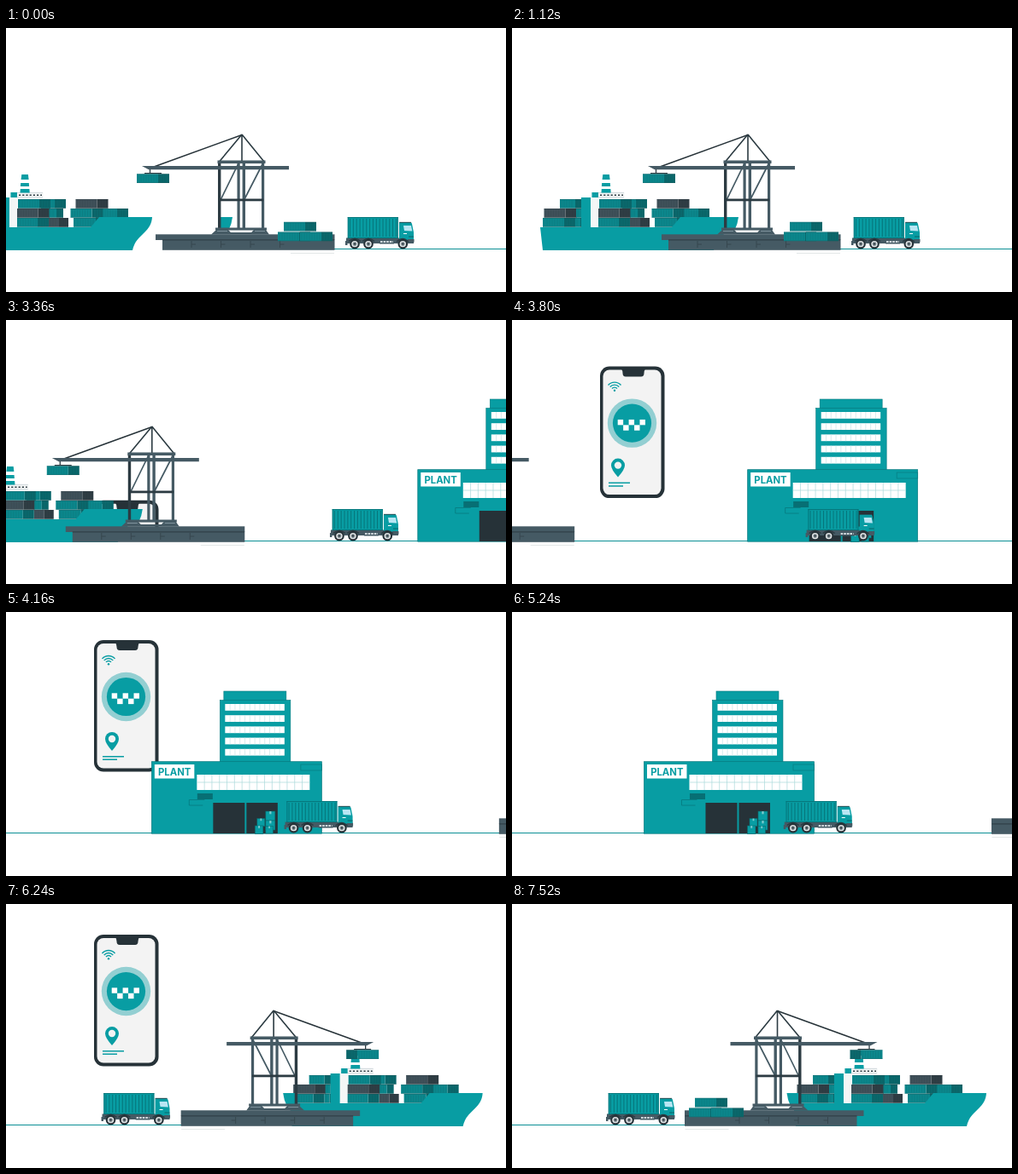
Animation, 585 px wide and 310 px high, one loop 8.04 s. Source, as an HTML page:

```html
<!DOCTYPE html>
<html lang="en">
<head>
<meta charset="utf-8">
<title>Container transport</title>
<style>
html, body { margin: 0; width: 100%; height: 100%; overflow: hidden; background: #fff; }
svg { display: block; }
</style>
</head>
<body>
<svg width="585" height="310" viewBox="0 0 585 310">
  <clipPath id="above"><rect width="585" height="259"/></clipPath>
  <g clip-path="url(#above)"><g id="phone"></g></g>
  <line id="ground" y1="259.5" y2="259.5" stroke="#0a8f95"/>
  <g id="plant"></g>
  <g id="ship1"></g>
  <g id="ship2"></g>
  <g id="port1"></g>
  <g id="port2"></g>
  <g id="load1"></g>
  <g id="load2"></g>
  <g id="truck"></g>
</svg>
<script>
const LOOP = 8040;
const TEAL = '#089da3', MID = '#0b878c', DEEP = '#0a686c';
const SLATE = '#455a64', DARK = '#263238', GREY = '#3f5059', INK = '#2c3b42';
const $ = id => document.getElementById(id);

const rect = (x, y, w, h, fill, extra = '') =>
  `<rect x="${x}" y="${y}" width="${w}" height="${h}" fill="${fill}" ${extra}/>`;
const path = (d, stroke, width = 1, extra = '') =>
  `<path d="${d}" fill="none" stroke="${stroke}" stroke-width="${width}" ${extra}/>`;
const shape = (d, fill) => `<path d="${d}" fill="${fill}"/>`;
const circle = (x, y, r, fill) => `<circle cx="${x}" cy="${y}" r="${r}" fill="${fill}"/>`;
const range = (n, f) => Array.from({ length: n }, (_, i) => f(i)).join('');

// Ribbed panel
function panel(x, y, w, h, fill) {
  const n = Math.floor((w - 1) / 3);
  return rect(x, y, w, h, fill) + path(`M${x} ${y + .4}h${w}M${x} ${y + h - .4}h${w}`, DARK, .6, 'opacity=".35"') +
    path(range(n, i => `M${x + 2 + i * 3} ${y + 1.5}v${h - 3}`), DARK, .5, 'opacity=".2"');
}

// Container with a lit long side and a shaded end
const container = (x, y, gray, w = 38, split = 25, h = 10.7) =>
  panel(x, y, split, h, gray ? GREY : MID) + panel(x + split, y, w - split, h, gray ? '#2f3d44' : DEEP);

function ship() {
  const tops = [201, 212, 223];
  return container(56, tops[0], 0, 26, 18) +
    container(37.5, tops[1], 1) + container(75, tops[1], 0, 8, 6) +
    container(36, tops[2], 0) + container(74, tops[2], 0, 9, 6) +
    container(129, tops[0], 0, 29, 16) + container(102, tops[0], 0) +
    container(138, tops[1], 0, 17, 9) + container(100.5, tops[1], 1) +
    container(138, tops[2], 1, 23, 12) + container(100, tops[2], 0) +
    container(169.5, tops[0], 1) +
    container(193, tops[1], 0) + container(163.5, tops[1], 0) +
    container(167, tops[2], 0, 34, 26) +
    rect(92, 193, 9, 41, '#f4f6f6') + rect(81, 199, 11, 36, TEAL) +
    rect(93.5, 193, 38, 6, '#f4f6f6') + rect(93.5, 193, 7.5, 6, TEAL) +
    path('M101 193.3h30M101 199h30', '#b0bec5', .6) +
    path('M103 196.2h27', INK, 1.6, 'stroke-dasharray="2.2 2"') +
    shape('M106.3 172h7.6l.7 6h-9zM105.2 182h9.6l.3 4h-10.2zM104.8 189h10.6l.3 4.5h-11.2z', TEAL) +
    shape('M33 234H187L197 222H259C258 241 240 242 236 261H36Z', TEAL);
}

function port() {
  return shape('M251 222H265Q264 230 261 236H251Z', TEAL) +
    // crane
    path('M276 125.5L173 163', DARK, 1.5) +
    path('M276 125L249.5 157M276 125L302 157M276 125V157', INK, 1.6) +
    path('M271.5 160L251.5 201M300 160L279 201', SLATE, 1.7) +
    rect(270.5, 158, 3.2, 78, SLATE) + rect(276.6, 158, 3.4, 78, SLATE) +
    rect(299, 158, 3.2, 78, SLATE) + rect(248, 158, 3.4, 78, INK) +
    rect(249, 200.5, 52, 2.8, INK) +
    rect(247.5, 155.5, 56, 3.6, SLATE) +
    shape('M159 162H331V166.2H167Z', SLATE) +
    rect(245, 234.5, 60, 3, SLATE) + shape('M246 237H260L263 240H287L290 237H304L308 242.5H240Z', SLATE) +
    path('M247 238.5h12M291 238.5h12', '#90a4ae', .8) +
    // trolley and hanging load
    path('M168.5 166V170M162 170.6H182', INK, 1.3) +
    container(153, 171.3, 0) +
    // quay
    rect(175, 242.3, 209.5, 6.7, SLATE) + rect(183, 248.5, 201.5, 12.3, SLATE) +
    path('M183 248.9H384', DARK, .8) +
    range(4, i => path(`M${217 + i * 34.5} 250v8m0-4h5`, '#37474f', 1)) +
    path('M333 264.5H384', '#e3e7e8');
}

function plant() {
  const windows = range(5, i => {
    const y = 108 + i * 13.2;
    return rect(86, y, 69.5, 7.8, '#fff') +
      path(range(11, k => `M${91.8 + k * 5.8} ${y}v7.8`), '#c5e4e6', .7);
  });
  const box = (x, y, s) => rect(x, y, s, s, TEAL, 'stroke="#0a686c" stroke-width=".6"') +
    rect(x + s * .4, y, s * .2, s * .3, '#7cc9cc');
  return rect(84.5, 93, 73, 11, TEAL, 'stroke="#07797e" stroke-width=".6"') +
    rect(80, 103.5, 82.5, 73, TEAL, 'stroke="#07797e" stroke-width=".6"') + windows +
    rect(0, 175.7, 199, 84.5, TEAL, 'stroke="#07797e" stroke-width=".7"') +
    rect(174.5, 179, 24.5, 7, 'none', 'stroke="#078085" stroke-width=".8"') +
    rect(3.5, 179, 46.5, 16.5, '#fff') +
    `<text x="26.8" y="191.5" text-anchor="middle" font-family="Inter, Open Sans, sans-serif" font-weight="700" font-size="11.3" fill="${TEAL}">PLANT</text>` +
    rect(53, 191, 132, 18, '#fff') +
    path(range(14, i => `M${61.8 + i * 8.8} 191v18`) + 'M53 200h132', '#a9d8da', .7) +
    rect(53.5, 213, 18, 7, '#076f74') +
    path('M44 220.5H62M44 220.5V227H60', '#07797e', .8) +
    rect(72, 224, 37, 36, DARK) + rect(111, 224, 36.5, 36, DARK) +
    box(133.5, 234, 11) + box(123.5, 242.5, 9) + box(133.5, 245, 11) +
    box(121, 251, 9.5) + box(133.5, 251.5, 8.5);
}

function truck() {
  const wheel = x => circle(x, 253.6, 5.8, DARK) + circle(x, 253.6, 3.7, '#e4e7e8') +
    circle(x, 253.6, 2.3, '#78858b') + circle(x, 253.6, 1, DARK);
  return rect(398, 246.5, 79, 6.5, SLATE) + rect(397, 250, 2.5, 5, SLATE) +
    rect(399.8, 222, 59, 25, TEAL) +
    path(range(15, i => `M${402.5 + i * 3.85} 224v21`), '#06757a', 1) +
    path('M399.8 222.6h59M399.8 246.5h59M400.3 222v25M458.3 222v25', '#06757a', 1) +
    shape('M460 229Q460 228 461 228H473Q474.5 228 475 230L477 240V249H460Z', TEAL) +
    path('M460 228.3H474', DARK, .8) +
    shape('M465 232H474L475.3 238.5L466 238Z', '#b9e6f3') +
    path('M465 241.5h4', '#fff', 1) + path('M471 245h6', '#066569', 1) +
    rect(470, 248, 7.5, 3.5, SLATE) +
    rect(437, 249, 17, 4.5, SLATE) +
    path('M438 251H453', '#cfd8dc', 2.2, 'stroke-dasharray="2.6 1"') +
    path('M401 250.5Q408 244 415 250.5M417 250.5Q424 244 431 250.5M457 251Q464 244 471 251', INK, 1.6) +
    wheel(408) + wheel(424) + wheel(464.3);
}

function phone() {
  const cell = (col, row) => rect(123.7 + col * 6.45, 62.3 + row * 6.4, 6.45, 6.4, '#fff');
  const arc = r => `M${120 - r * .75} ${28.5 - r * .66}A${r} ${r} 0 0 1 ${120 + r * .75} ${28.5 - r * .66}`;
  return rect(103, 0, 75.5, 154.5, DARK, 'rx="11"') +
    rect(106.5, 4, 68, 146.5, '#f3f3f3', 'rx="7.5"') +
    shape('M128 3H156Q154.5 5 154.5 8Q154.5 12 151 12H133Q129.5 12 129.5 8Q129.5 5 128 3Z', DARK) +
    path(arc(4) + arc(7) + arc(10), TEAL, 1.4) + circle(120, 28.2, 1.2, TEAL) +
    circle(140.5, 66.5, 28.7, '#93cfd2') + circle(140.5, 66.5, 22.6, TEAL) +
    cell(0, 0) + cell(2, 0) + cell(4, 0) + cell(1, 1) + cell(3, 1) +
    shape('M124 130Q116 121 116 116A8 8 0 0 1 132 116Q132 121 124 130Z', TEAL) + circle(124, 116, 4.2, '#f3f3f3') +
    path('M113 136.7H138M113 140.3H130', TEAL, 1.5);
}

// Quay stack, bottom left first
const stack = [[318, 239.5], [344, 239.5], [325, 227.8]];
const load = stack.map(([x, y]) => `<g>${container(x, y, 0)}</g>`).join('');

$('ship1').innerHTML = $('ship2').innerHTML = ship();
$('port1').innerHTML = $('port2').innerHTML = port();
$('load1').innerHTML = $('load2').innerHTML = load;
$('plant').innerHTML = plant();
$('truck').innerHTML = truck();
$('phone').innerHTML = phone();

const ramp = (t, start, length) => Math.min(1, Math.max(0, (t - start) / length));

// Smoothstep, blended with a share of linear motion
const ease = (t, start, length, linear = 0) => {
  const u = ramp(t, start, length);
  return linear * u + (1 - linear) * u * u * (3 - 2 * u);
};
const move = (id, x, y = 0) => $(id).setAttribute('transform', `translate(${x} ${y})`);

function lift(el, dy, opacity) {
  el.setAttribute('transform', `translate(0 ${dy})`);
  el.setAttribute('opacity', opacity);
}

function draw(t) {
  const leg1 = ease(t, 2960, 1250, .1), leg2 = ease(t, 5110, 1190);
  const cam = 420 * leg1 + 371.5 * leg2;

  move('port1', -cam);
  move('load1', -cam);
  move('ship1', 88 * (ease(t, 0, 1110) - 1) - cam);
  move('plant', 587 - cam);
  move('ship2', 1087.5 - cam);
  move('load2', 680.5 - cam);
  $('port2').setAttribute('transform', `translate(${1378 - cam} 0) scale(-1 1)`);
  move('truck', -72 * leg1 - 215 * leg2);
  $('ground').setAttribute('x1', 384 - cam);
  $('ground').setAttribute('x2', 994 - cam);

  const first = t < 5300;
  move('phone', 0, 260 - 227 * ease(t, first ? 3105 : 5440, 860));
  $('phone').setAttribute('opacity', 1 - ramp(t, first ? 4960 : 7360, 160));

  stack.forEach(([, y], i) => {
    const up = 1740 + (2 - i) * 320, down = 6360 + i * 180;
    lift($('load1').children[i], (163 - y) * ease(t, up, 340), 1 - ramp(t, up + 180, 160));
    lift($('load2').children[i], (155 - y) * (1 - ease(t, down, 200)), ramp(t, down, 100));
  });
}

function tick(now) {
  draw(now % LOOP);
  requestAnimationFrame(tick);
}
draw(0);
requestAnimationFrame(tick);
</script>
</body>
</html>
```
